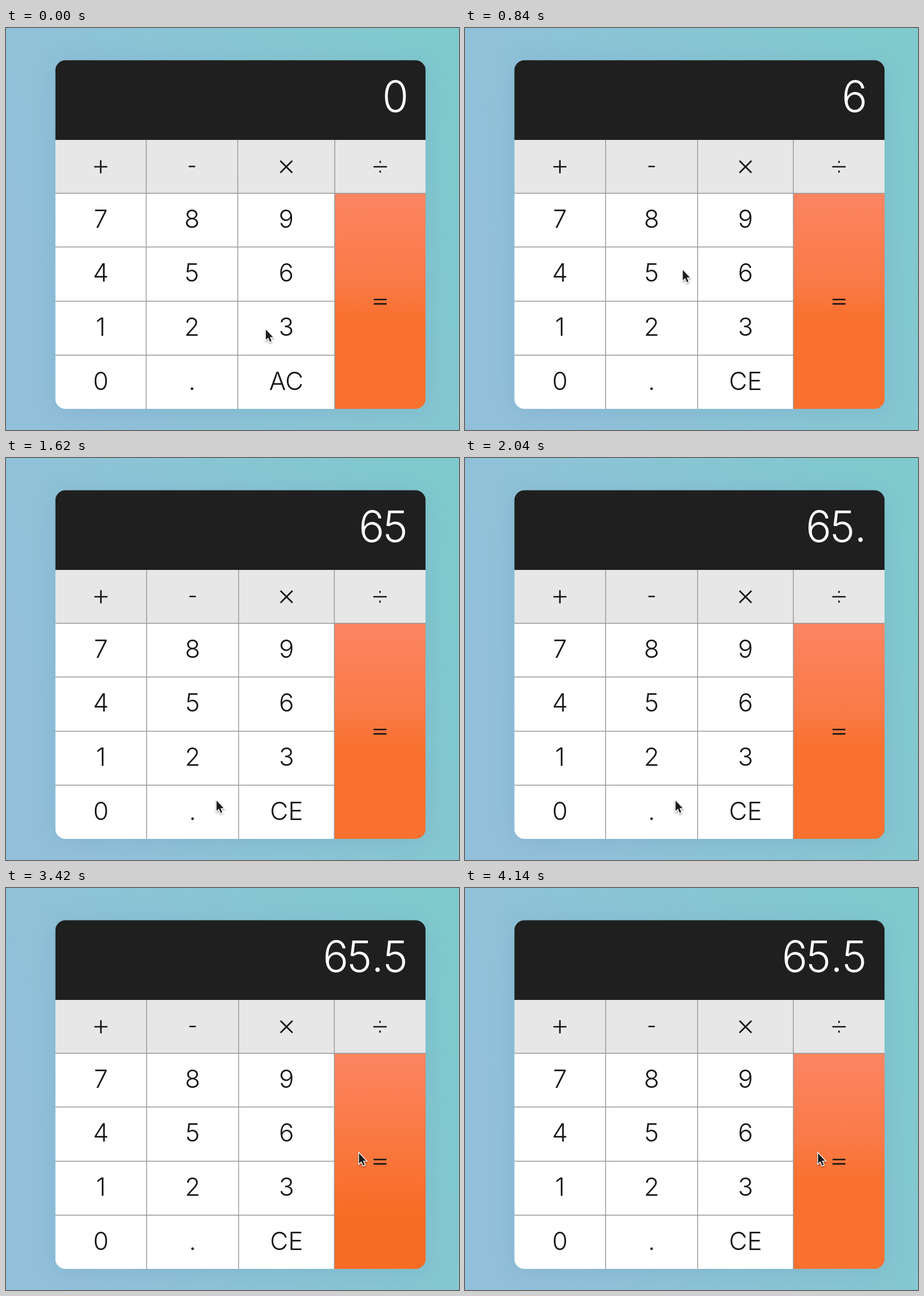
An HTML page that plays this animation: 795 by 704 pixels, repeating every 4200 ms.

```html
<!DOCTYPE html>
<html lang="en">
<head>
<meta charset="utf-8">
<title>Calculator</title>
<style>
  html, body { margin: 0; width: 100%; height: 100%; overflow: hidden; }
  svg { display: block; }
  #stage { width: 100%; height: 100%; }
  text { font-family: Inter, "Helvetica Neue", "Liberation Sans", sans-serif; font-weight: 300; text-anchor: middle; }
  .key { font-size: 44px; fill: #161616; }
  .digit { font-size: 75px; fill: #fff; }
  .symbol { fill: none; stroke: #161616; stroke-width: 2.7; }
  .rule { fill: none; stroke: #969696; stroke-width: 1.4; }
</style>
</head>
<body>
<svg id="stage" viewBox="0 0 795 704" preserveAspectRatio="none">
  <defs>
    <linearGradient id="sky" gradientUnits="userSpaceOnUse" x1="60" y1="400" x2="795" y2="140">
      <stop offset="0" stop-color="#92c0da"/>
      <stop offset="1" stop-color="#7fcacd"/>
    </linearGradient>
    <linearGradient id="orange" x2="0" y2="1">
      <stop offset="0" stop-color="#fc8562"/>
      <stop offset=".4" stop-color="#fa7a48"/>
      <stop offset=".58" stop-color="#f8712f"/>
    </linearGradient>
    <linearGradient id="orangePressed" x2="0" y2="1">
      <stop offset="0" stop-color="#fc8562"/>
      <stop offset=".45" stop-color="#fa773d"/>
      <stop offset=".76" stop-color="#f86b24"/>
    </linearGradient>
    <clipPath id="card"><rect x="86.5" y="56.5" width="650" height="610.5" rx="18"/></clipPath>
    <filter id="soft" x="-20%" y="-20%" width="140%" height="140%"><feGaussianBlur stdDeviation="20"/></filter>
    <filter id="inset" x="-20%" y="-20%" width="140%" height="140%"><feGaussianBlur stdDeviation="3"/></filter>
    <filter id="drop" x="-60%" y="-40%" width="220%" height="200%">
      <feDropShadow dx="0" dy="2" stdDeviation="1.8" flood-opacity=".4"/>
    </filter>
  </defs>
  <rect width="795" height="704" fill="url(#sky)"/>
  <rect x="86" y="62" width="651" height="608" rx="18" fill="#6f9fc0" opacity=".4" filter="url(#soft)"/>
  <g id="calculator" clip-path="url(#card)"></g>
  <path id="cursor" d="M0 0V18L4.2 14.2 7.3 21.5 10 20.3 7 13.2H12.5Z" fill="#1c1c1c"
        stroke="#fff" stroke-width="2.6" paint-order="stroke" filter="url(#drop)"/>
</svg>
<script>
const LOOP = 4200, STEP = 60;
const LEFT = 86.5, RIGHT = 736.5;
const ROWS = [196, 289.5, 383.5, 478.5, 573, 667];
const FADE = 60;

// [time, x, y] of the pointer tip
const POINTER = [
  [0, 456, 528], [60, 456, 528], [420, 472, 420], [640, 472, 420],
  [880, 375, 424], [1200, 375, 424], [1620, 369.5, 600], [2060, 369.5, 600],
  [2340, 372, 440], [2540, 372, 440], [2700, 539, 463.5], [2880, 619.5, 464.5]
];

const PRESSES = [
  { key: "6", from: 440, to: 600 },
  { key: "5", from: 900, to: 1020 },
  { key: ".", from: 1740, to: 1860 },
  { key: "5", from: 2400, to: 2520 },
  { key: "=", from: 3300, to: 3540 }
];

const SYMBOLS = {
  "+": "M-11.5 0H11.5M0-11.5V11.5",
  "-": "M-5.7-.5H5.7",
  "×": "M-10.5-10.5 10.5 10.5M10.5-10.5-10.5 10.5",
  "÷": "M-11.8 0H11.8M0-10.3V-6.8M0 6.8V10.3",
  "=": "M-11.3-3.8H11.3M-11.3 3.8H11.3"
};

const calculator = document.getElementById("calculator");
const cursor = document.getElementById("cursor");

const clamp = v => Math.max(0, Math.min(1, v));
const ease = v => v * v * (3 - 2 * v);
const rect = (x, y, w, h, fill, more = "") =>
  `<rect x="${x}" y="${y}" width="${w}" height="${h}" fill="${fill}" ${more}/>`;
const symbol = (name, x, y) =>
  `<path class="symbol" d="${SYMBOLS[name]}" transform="translate(${x} ${y})"/>`;

function pointerAt(t) {
  const next = POINTER.findIndex(p => p[0] > t);
  if (next < 0) return POINTER[POINTER.length - 1].slice(1);
  const [t0, x0, y0] = POINTER[next - 1], [t1, x1, y1] = POINTER[next];
  const k = ease((t - t0) / (t1 - t0));
  return [x0 + (x1 - x0) * k, y0 + (y1 - y0) * k];
}

function displayAt(t) {
  const typed = PRESSES.filter(p => p.key !== "=" && t >= p.to).map(p => p.key).join("");
  return typed || "0";
}

const pressure = (key, t) => Math.max(0, ...PRESSES.filter(p => p.key === key)
  .map(p => Math.min(clamp((t - p.from) / FADE), clamp((p.to + FADE - t) / FADE))));

// Right-aligned figures with a half-width decimal point
function drawDisplay(value) {
  let right = 704.5, out = rect(LEFT, 56, 650, 140, "#1f1f1f");
  for (const char of [...value].reverse()) {
    const advance = char === "." ? 21 : 42;
    out += `<text class="digit" x="${right - advance / 2}" y="147">${char}</text>`;
    right -= advance;
  }
  return out;
}

function drawPressed(x, y, w, h, amount) {
  return `<svg x="${x}" y="${y}" width="${w}" height="${h}" opacity="${amount}">
    ${rect(0, 0, w, h, "#efefef")}
    ${rect(0, 0, w, h, "none", 'stroke="#bdbdbd" stroke-width="7" filter="url(#inset)"')}</svg>`;
}

function drawCalculator(t) {
  const value = displayAt(t), cleared = value === "0";
  const cols = cleared ? [LEFT, 246, 406.7, 577, RIGHT] : [LEFT, 246.7, 408.3, 576.2, RIGHT];
  const center = c => (cols[c] + cols[c + 1]) / 2;
  const labels = ["789", "456", "123", ["0", ".", cleared ? "AC" : "CE"]];
  const [x1, x2, x3] = cols.slice(1);

  let out = drawDisplay(value);
  out += rect(LEFT, 196, 650, 94, "#e7e7e7") + rect(LEFT, ROWS[1], 490, 378, "#fff");
  [..."+-×÷"].forEach((name, c) => out += symbol(name, center(c), 243));

  const equal = [x3, ROWS[1], RIGHT - x3, 378];
  out += rect(...equal, "url(#orange)");
  out += rect(...equal, "url(#orangePressed)", `opacity="${pressure("=", t)}"`);
  out += symbol("=", center(3), 479.3);

  labels.forEach((row, r) => [...row].forEach((label, c) => {
    const top = ROWS[r + 1], amount = pressure(label, t);
    if (amount) out += drawPressed(cols[c], top, cols[c + 1] - cols[c], ROWS[r + 2] - top, amount);
    out += `<text class="key" x="${center(c)}" y="${top + 60.5}">${label}</text>`;
  }));

  const across = ROWS.slice(2, 5).map(y => `M${LEFT} ${y}H${x3}`).join("");
  const down = [x1, x2, x3].map(x => `M${x} 196V667`).join("");
  return out + `<path class="rule" d="M${LEFT} ${ROWS[1]}H${RIGHT}${across}${down}"/>`;
}

function render(t) {
  calculator.innerHTML = drawCalculator(t);
  cursor.setAttribute("transform", `translate(${pointerAt(t).join(" ")})`);
}

let shown = -1, start;
function tick(now) {
  start ??= now;
  const t = Math.floor(((now - start) % LOOP) / STEP) * STEP;
  if (t !== shown) render(shown = t);
  requestAnimationFrame(tick);
}
render(0);
requestAnimationFrame(tick);
</script>
</body>
</html>
```
